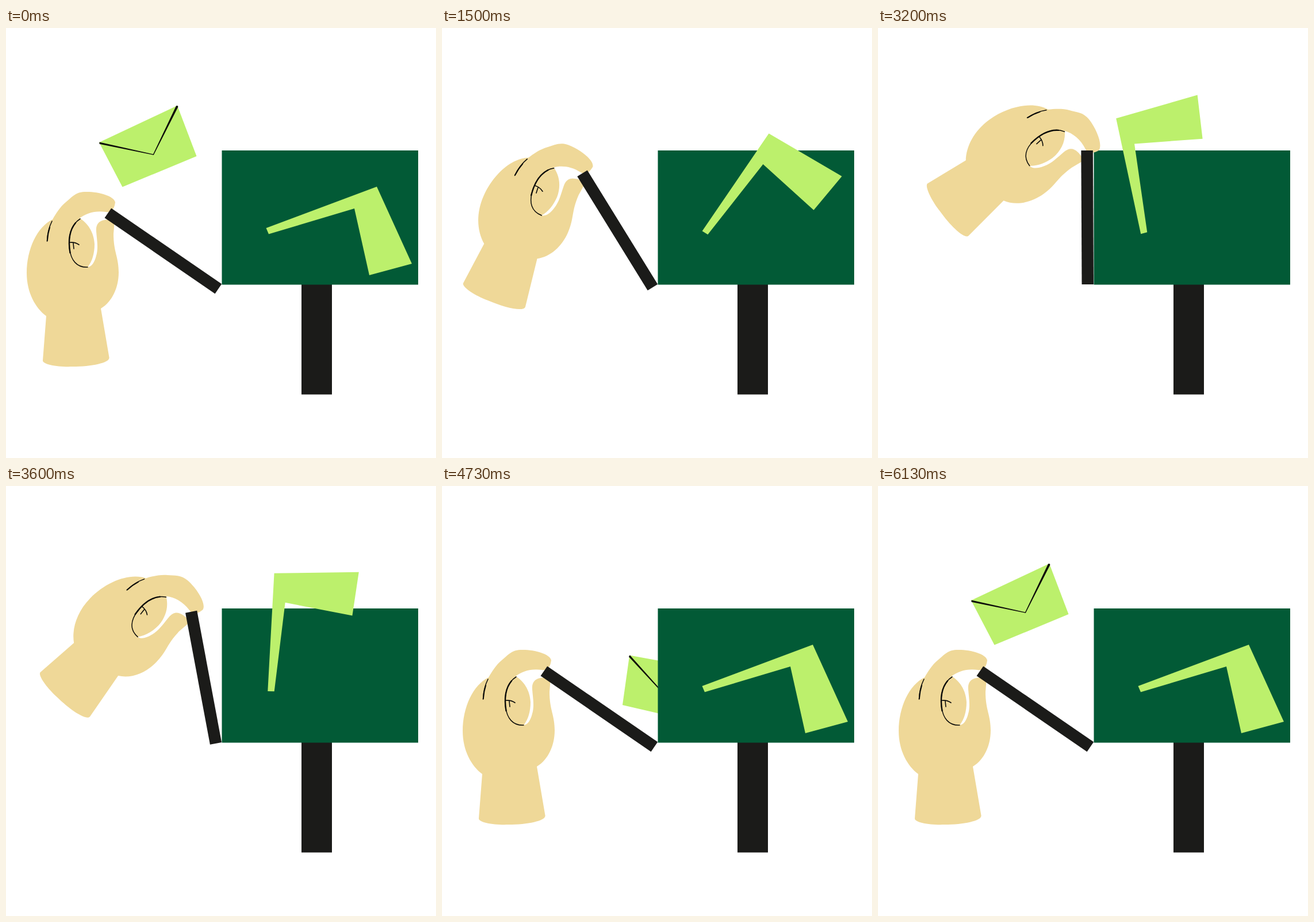
Recreate the animation shown at these times as an HTML page. Size 748 by 748 pixels, loop 6.63 s.

```html
<!DOCTYPE html>
<html lang="en">
<head>
<meta charset="utf-8">
<title>Mailbox</title>
<style>
  html, body { margin: 0; width: 100%; height: 100%; overflow: hidden; background: #fff; }
  svg { display: block; width: 100%; height: 100%; }
  .lime { fill: #bcf06c; }
  .ink { fill: #1b1b19; }
  .skin { fill: #efd898; }
  .line { fill: none; stroke: #0b0b08; stroke-linecap: round; stroke-linejoin: round; }
</style>
</head>
<body>
<svg viewBox="0 0 748 748">
  <g id="letter">
    <path class="lime" d="M162 199 298 135 331.500 223 202.500 276.500Z"/>
    <path d="M162.500 198.500 256 219.500 295.500 136.500Q298 133.500 299.500 137L256.800 221 162.500 201.800Z" fill="#0b0b08"/>
  </g>
  <rect class="ink" x="514" y="440" width="53" height="197.500"/>
  <rect x="375.500" y="213" width="341.500" height="233.500" fill="#025a36"/>
  <g id="hand">
    <path class="skin" d="M190 303
      C188 292 160 284 136 285 C120 286 114 295 104 303 C94 311 86 324 81 333
      C54 346 36 385 36 426 C36 460 51 487 70 501 L64 578
      C63 585 90 590 115 589 C150 589 181 582 179.500 573 L165 488
      C185 476 196 451 196 425 C196 398 187 390 187 358 L189 335
      Q178 332 171 334 C161 336 156 342 157 354 C158 368 161 382 157 396
      C154 408 149 415 142 416 C150 406 154 392 154 376 C153 355 142 339 128 331
      C139 322 156 317 174 320 C184 322 189 313 190 303Z"/>
    <g class="line">
      <path d="M80 336Q72 352 71.500 371" stroke-width="1.500"/>
      <path d="M76 347Q72.500 358 71.800 370" stroke-width="2"/>
      <path d="M129 332C113 342 108 362 110.500 384C113 404 123 417 142 416" stroke-width="1.500"/>
      <path d="M121 339C110 352 108 370 111.500 391" stroke-width="2.400"/>
      <path d="M111 373Q120 372 127 377M117 374.500 118 384" stroke-width="1.600"/>
    </g>
  </g>
  <rect id="lid" class="ink" x="354.500" y="213" width="20.500" height="233"/>
  <path id="flag" class="lime" d="M645 276 706 410 632 430 606 314 457 358.500 452.500 348Z"/>
</svg>
<script>
const LOOP = 6630, REOPENED = 4650, SPIN = 1140;
const [letter, hand, lid, flag] = ['letter', 'hand', 'lid', 'flag'].map(id => document.getElementById(id));

const clamp = x => Math.min(1, Math.max(0, x));
const ease = (t, start, span) => (1 - Math.cos(Math.PI * clamp((t - start) / span))) / 2;
const turn = (el, deg, x, y) => el.setAttribute('transform', `rotate(${deg} ${x} ${y})`);

// 20 steps per second, shown alternately for 30 and 70 ms
const step = ms => 50 * (2 * Math.floor(ms / 100) + (ms % 100 >= 30 ? 1 : 0));

function placeLetter(t) {
  let dx = 0, dy = 0, deg = 0, size = 1;
  if (t < SPIN) {
    const p = Math.pow(t / SPIN, 2.1);
    deg = 360 * p;
    size = 1 - p;
  } else {
    const left = 1 - ease(t, REOPENED, 1450);
    dx = 146 * left;
    dy = 145 * left;
    deg = 36 * left;
  }
  const shown = t < SPIN || t >= REOPENED;
  letter.setAttribute('visibility', shown ? 'visible' : 'hidden');
  letter.setAttribute('transform',
    `translate(${246.5 + dx} ${206 + dy}) rotate(${deg}) scale(${size}) translate(-246.5 -206)`);
}

function draw(ms) {
  const t = step(ms);
  const closed = t < REOPENED ? ease(t, 750, 1650) - ease(t, 3125, 1650) : 0;
  placeLetter(t);
  turn(hand, 54.8 * closed, 374, 446);
  turn(lid, 55.5 * (closed - 1), 374.5, 445.5);
  turn(flag, -82 * closed, 460.8, 350.4);
}

const begin = performance.now();
function tick() {
  draw((performance.now() - begin) % LOOP);
  requestAnimationFrame(tick);
}
tick();
</script>
</body>
</html>
```
